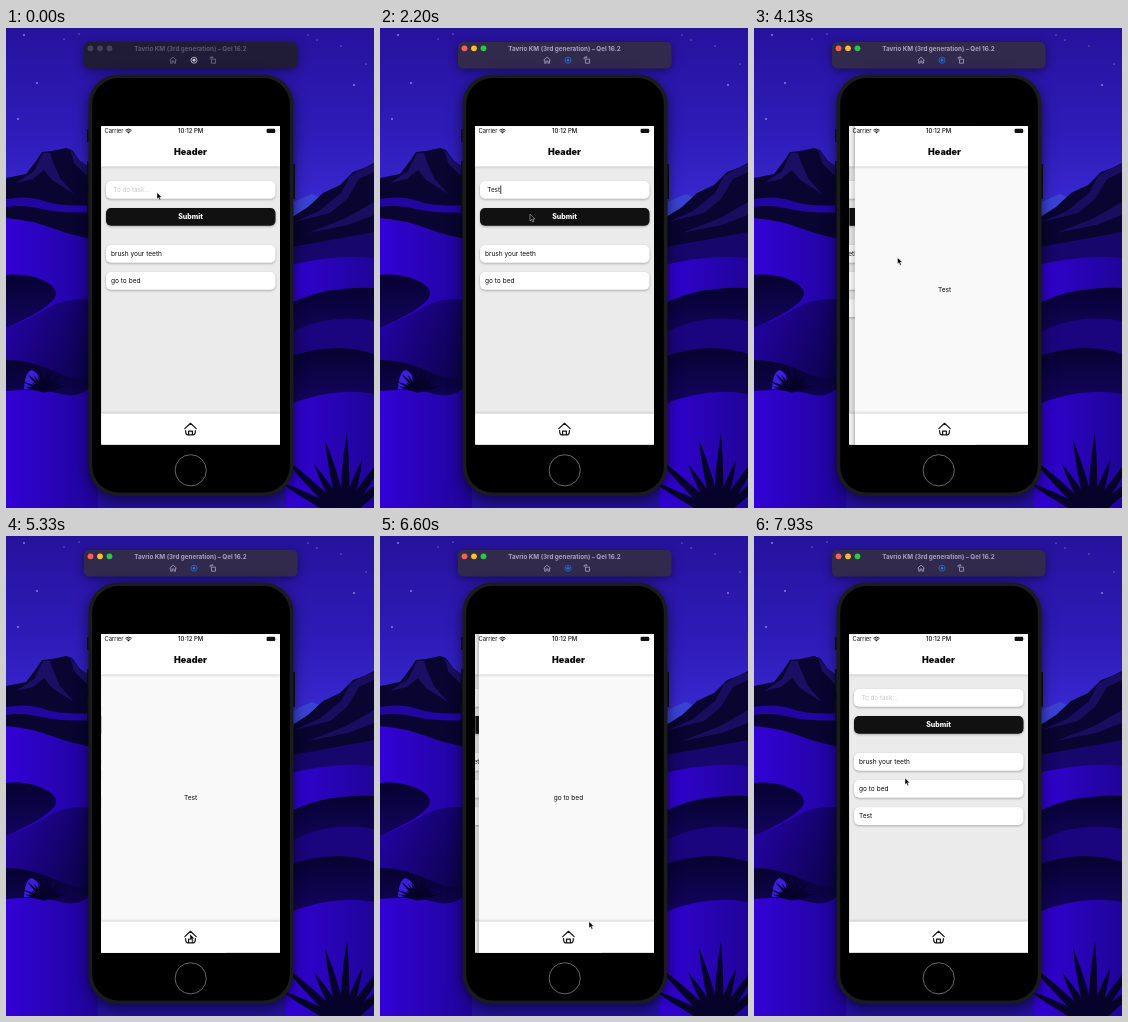
An HTML page for the animation above (8000 ms loop, 368 by 480 pixels).

```html
<!DOCTYPE html>
<html lang="en">
<head>
<meta charset="utf-8">
<title>To-do app demo</title>
<style>
html, body { margin: 0; width: 100%; height: 100%; overflow: hidden; background: #24109c; }
svg { display: block; width: 100vw; height: 100vh; }
text { font: 400 6.55px Inter, sans-serif; fill: #0b0b0b; }
.mid { text-anchor: middle; }
.title { font-size: 6.25px; font-weight: 700; fill: #aaa3bf; }
.header { font-size: 9px; font-weight: 900; }
.submit { font-size: 7px; font-weight: 800; fill: #fff; }
.hint { font-size: 6.35px; fill: #c9c9cc; }
.status { font-size: 5.8px; }
.time { font-size: 6px; font-weight: 500; }
.card { fill: #fff; filter: drop-shadow(0 1px 1.2px rgba(0,0,0,.28)); }
.bar { fill: #fff; filter: drop-shadow(0 0 1.7px rgba(0,0,0,.3)); }
.line { fill: none; stroke: #111; stroke-width: 1; stroke-linecap: round; stroke-linejoin: round; }
.tool { fill: none; stroke: #aaa3bf; stroke-width: .8; }
.inactive .title { fill: #5d5771; }
.inactive .tool { stroke: #777089; }
.inactive .lamp { fill: #464058; }
.inactive .frame { fill: #201c37; }
.inactive .shot { stroke: #d2cfdd; }
.inactive .shot-dot { fill: #d2cfdd; }
.shot { stroke: #2470df; }
.shot-dot { fill: #2470df; }
</style>
</head>
<body>
<svg viewBox="0 0 368 480" preserveAspectRatio="none">
<defs>
  <linearGradient id="sky" x1="0" y1="0" x2="0" y2="1">
    <stop offset="0" stop-color="#26129c"/>
    <stop offset=".5" stop-color="#2f1cba"/>
    <stop offset=".85" stop-color="#3a2ad2"/>
  </linearGradient>
  <linearGradient id="lit">
    <stop offset="0" stop-color="#3202d6"/>
    <stop offset="1" stop-color="#1f0598"/>
  </linearGradient>
  <linearGradient id="dusk" x1="0" y1="0" x2="1" y2=".5">
    <stop offset="0" stop-color="#2503ac"/>
    <stop offset="1" stop-color="#0c0348"/>
  </linearGradient>
  <linearGradient id="dark" x1="0" y1="0" x2="0" y2="1">
    <stop offset="0" stop-color="#070230"/>
    <stop offset="1" stop-color="#130460"/>
  </linearGradient>
  <linearGradient id="edge">
    <stop offset="0" stop-color="#000" stop-opacity="0"/>
    <stop offset="1" stop-color="#000" stop-opacity=".12"/>
  </linearGradient>
  <clipPath id="screen"><rect x="95.3" y="98.3" width="178.7" height="318.3"/></clipPath>
  <g id="house">
    <path class="line" style="stroke-width:1.2" d="M178.8 400.6l5.7-5.3 5.7 5.3M179.6 402.5q0 4.4 2.2 4.4h5.4q2.2 0 2.2-4.4M182.6 406.7v-3.6h3.8v3.6"/>
  </g>
  <g id="chrome">
    <rect class="bar" x="95" y="90" width="179" height="48.5"/>
    <text class="header mid" x="184.5" y="126.7">Header</text>
    <rect class="bar" x="95" y="385.5" width="179" height="40"/>
    <use href="#house"/>
  </g>
</defs>

<g id="wallpaper">
  <rect width="368" height="220" fill="url(#sky)"/>
  <g id="stars" fill="#cfc8ff"></g>
  <g id="left-dunes">
    <path fill="#090430" d="M0 150l20-4 10-13 6-9 10-1 14-3 6 2 8 11 18 12v70H0z"/>
    <path fill="#1a0f62" d="M37 125l-9 18-18 12 17-4 11-9 8 10 22 14-14-16-7-16-3-9zM64 121l4 14 12 12 12 6v-8l-17-11z"/>
    <path fill="#2206a2" d="M0 171q22-4 38 2t54 4v7q-36 2-56-3t-36-2z"/>
    <path fill="url(#lit)" d="M0 190q25 2 46 10t46 12v94H0z"/>
    <path fill="url(#dark)" d="M0 247C26 244 49 255 50 265S25 289 0 300z"/>
    <path fill="url(#dusk)" d="M0 300Q26 290 44 279T92 272v108H0z"/>
    <path fill="url(#dark)" d="M0 332q25 0 50 12t42 4v40H0z"/>
    <path fill="url(#lit)" d="M0 363q34-3 55 3t37-14v128H0z"/>
  </g>
  <g id="right-dunes">
    <path fill="#3a42d6" d="M280 178l14-7 12-5 10 4 20 15v15h-56z"/>
    <path fill="#090430" d="M280 193l22-14 15-14 17-8 13-13 11-4 10-5v115h-88z"/>
    <path fill="#190d60" d="M344 148l-9 17-22 18-25 11 36-9 17-14 12-20 15-7v-8l-14 6zM368 174l-28 16-38 15 40-8 26-10z"/>
    <path fill="#17066c" d="M280 220q45-8 88-16v62h-88z"/>
    <path fill="url(#lit)" d="M280 238q48-12 88-8v80h-88z"/>
    <path fill="url(#dark)" d="M280 278q35-20 88-18v50h-88z"/>
    <path fill="#1b057e" d="M280 308q40-24 88-15v50h-88z"/>
    <path fill="url(#dark)" d="M280 330q48-18 88-4v50h-88z"/>
    <path fill="url(#lit)" d="M280 378q46-20 88-12v114h-88z"/>
  </g>
  <path fill="#3a20dc" d="M18 361q1-18 8-19 8 3 11 18z"/>
  <g id="plants" fill="#070229"></g>
</g>

<g id="window">
  <rect class="frame" x="78" y="14" width="213.5" height="26.5" rx="5" fill="#312a4c" style="filter:drop-shadow(0 2px 5px rgba(0,0,0,.45))"/>
  <circle class="lamp" cx="84.5" cy="20.3" r="2.9" fill="#ff5f57"/>
  <circle class="lamp" cx="94" cy="20.3" r="2.9" fill="#febc2e"/>
  <circle class="lamp" cx="103.5" cy="20.3" r="2.9" fill="#28c840"/>
  <text class="title mid" x="184.5" y="22.5">Tavrio KM (3rd generation) – Qel 16.2</text>
  <path class="tool" d="M163.6 32.2l3.5-3 3.5 3M164.7 32v3.2h1.5V33h1.8v2.2h1.5V32"/>
  <circle class="tool shot" cx="188" cy="32.2" r="3"/>
  <circle class="shot-dot" cx="188" cy="32.2" r="1.4"/>
  <path class="tool" d="M205.5 31.2h4v4h-4zM204.2 31.3v-2h2.6M205.8 28.1l1.2 1.2-1.2 1.2"/>
</g>

<g id="phone">
  <path fill="#101014" d="M81 101h3v13h-3zM81 133h3v22h-3zM81 163h3v22h-3zM286 136h3v35h-3z"/>
  <rect x="82.5" y="46.5" width="205" height="421.5" rx="30" fill="#1b1b1e" style="filter:drop-shadow(0 4px 7px rgba(0,0,0,.6))"/>
  <rect x="86.2" y="50" width="197.6" height="414.5" rx="26.5" fill="#000"/>
  <circle cx="184.7" cy="442.3" r="15.6" fill="none" stroke="#747477" stroke-width=".9"/>
</g>

<g clip-path="url(#screen)">
  <rect x="95" y="98" width="180" height="320" fill="#fff"/>
  <g id="list">
    <rect x="95" y="98" width="179" height="319" fill="#ebebeb"/>
    <use href="#chrome"/>
    <rect class="card" x="100" y="153" width="169.5" height="17.8" rx="5"/>
    <text id="field" class="hint" x="107.3" y="164.3">To do task...</text>
    <rect id="caret" x="107.2" y="157.5" width=".9" height="8.5" fill="#222"/>
    <rect class="card" x="100" y="180" width="169.5" height="17.7" rx="5" style="fill:#111"/>
    <text class="submit mid" x="184.5" y="191.4">Submit</text>
    <g id="rows"></g>
    <g id="menu">
      <path d="M109 134h43q5 0 5 5v7q0 5-5 5h-32l-3 3-3-3h-5q-5 0-5-5v-7q0-5 5-5z" fill="#f5f5f5" style="filter:drop-shadow(0 1px 4px rgba(0,0,0,.25))"/>
      <path d="M134.5 134v17" stroke="#dedede" stroke-width=".6"/>
      <text x="110.6" y="144.8">Paste</text>
      <path class="line" style="stroke-width:.7" d="M142.8 141v-1.8h1.8M147.8 139.2h1.8v1.8M149.6 144.4v1.8h-1.8M144.6 146.2h-1.8v-1.8M144.4 141.5h3.6M144.4 142.8h3.6M144.4 144.1h2.2"/>
    </g>
    <rect id="dim" x="95" y="98" width="179" height="319"/>
  </g>
  <g id="detail">
    <rect x="90" y="98" width="5" height="319" fill="url(#edge)"/>
    <rect x="95" y="98" width="179" height="319" fill="#f9f9f9"/>
    <use href="#chrome"/>
    <text id="task" class="mid" x="184.5" y="264"></text>
  </g>
  <text class="status" x="98.4" y="105.3">Carrier</text>
  <path fill="#111" d="M122.5 105.6l-1.3-1.4q1.3-1 2.6 0z"/>
  <path class="line" d="M119.4 102.3q3.1-2.6 6.2 0M120.5 103.5q2-1.5 4 0" style="stroke-width:.95;stroke-linecap:butt"/>
  <text class="time mid" x="184.7" y="105.3">10:12 PM</text>
  <rect x="260.6" y="100.8" width="8.6" height="4.3" rx="1.1" fill="#111"/>
  <path d="M269.8 102.2q1 .7 0 1.5z" fill="#111"/>
</g>

<path id="pointer" d="M0 0v6.6l1.5-1.4 1.1 2.5 1.2-.5-1.1-2.5h2.1z" fill="#000" stroke="#fff" stroke-width=".45"/>
</svg>

<script>
const LOOP = 8000, WIDTH = 179;
const $ = id => document.getElementById(id);

// Page changes: start time, direction and the task that is opened.
const slides = [
  { at: 3870, open: true, task: 'Test' },
  { at: 5500, open: false, task: 'Test' },
  { at: 6315, open: true, task: 'go to bed' },
  { at: 7330, open: false, task: 'go to bed' }
];
const pointerPath = [
  [0, 151, 164.5], [1800, 151, 164.5], [2250, 150, 187], [2620, 150, 187],
  [3100, 147, 302], [3450, 147, 302], [3720, 147, 280], [3900, 146, 276],
  [4130, 143.5, 229.5], [4750, 146, 232], [5250, 184, 398], [5520, 184, 398],
  [5800, 156, 272], [6100, 151, 252], [6320, 151, 252], [6600, 209, 385.5],
  [6850, 186, 399], [7390, 186, 399], [7760, 151, 242], [LOOP, 151, 242]
];
const keyTimes = [1420, 1520, 1610, 1700];
const caretOn = [[870, 2300], [2600, 3325], [5500, 6090]];
const ADDED = 2600;

const within = (t, [from, to]) => t >= from && t < to;
const clamp = v => Math.min(1, Math.max(0, v));
const ease = p => p * p * (3 - 2 * p);
const shift = (node, x, y = 0) => node.setAttribute('transform', `translate(${x.toFixed(2)} ${y.toFixed(2)})`);
const show = (node, on) => node.style.opacity = +on;

function buildScenery() {
  const stars = [[18, 7], [73, 6], [58, 11], [31, 55], [302, 7], [311, 12], [348, 57], [335, 18], [360, 36], [12, 91]];
  $('stars').innerHTML = stars.map(([x, y], i) =>
    `<circle cx="${x}" cy="${y}" r="${i % 3 ? .5 : .8}"/>`).join('');
  const blade = (x, y, angle, length, width) =>
    `<path transform="translate(${x} ${y}) rotate(${angle})" d="M${-width} 0Q${-width * 1.4} ${-length * .5} 0 ${-length}Q${width * 1.4} ${-length * .5} ${width} 0z"/>`;
  let blades = '';
  for (let i = 0; i < 15; i++)
    blades += blade(38, 363, -77 + i * 11, 20 + 5 * Math.sin(i * 2.4), 1.5);
  for (let i = 0; i < 8; i++)
    blades += blade(338, 488, -62 + i * 16, 74 + 15 * Math.sin(i * 2.2), 4);
  $('plants').innerHTML = blades;
}

function buildRows() {
  $('rows').innerHTML = ['brush your teeth', 'go to bed', 'Test'].map((label, i) =>
    `<g><rect class="card" x="100" y="${217 + i * 27.1}" width="169.5" height="17.7" rx="5"/>
     <text x="105" y="${228.2 + i * 27.1}">${label}</text></g>`).join('');
}

function pointerAt(t) {
  const i = pointerPath.findIndex(key => key[0] > t);
  const [t0, x0, y0] = pointerPath[i - 1], [t1, x1, y1] = pointerPath[i];
  const p = ease((t - t0) / (t1 - t0));
  return [x0 + (x1 - x0) * p, y0 + (y1 - y0) * p];
}

// How far the detail page is open, following a critically damped spring.
function openness(t, slide) {
  if (!slide) return 0;
  const x = (t - slide.at) / 50;
  const left = x > 10 ? 0 : (1 + x) * Math.exp(-x);
  return slide.open ? 1 - left : left;
}

function render(t) {
  $('window').classList.toggle('inactive', t < 100);

  const typed = t < 2550 ? keyTimes.filter(k => t >= k).length : 0;
  const field = $('field');
  field.textContent = typed ? 'Test'.slice(0, typed) : 'To do task...';
  field.style.fill = typed ? '#111' : '';
  shift($('caret'), typed ? field.getComputedTextLength() + .4 : 0);
  show($('caret'), caretOn.some(span => within(t, span)));
  $('menu').style.opacity = clamp((t - 900) / 150) * clamp((1480 - t) / 120);
  show($('rows').lastElementChild, t >= ADDED);

  const slide = slides.filter(s => t >= s.at).pop();
  const open = openness(t, slide);
  shift($('list'), -.3 * WIDTH * open);
  shift($('detail'), WIDTH * (1 - open));
  show($('detail'), open > .0005);
  $('dim').style.opacity = .05 * open;
  $('task').textContent = slide ? slide.task : '';

  shift($('pointer'), ...pointerAt(t));
}

buildScenery();
buildRows();
const start = performance.now();
(function tick() {
  render((performance.now() - start) % LOOP);
  requestAnimationFrame(tick);
})();
</script>
</body>
</html>
```
